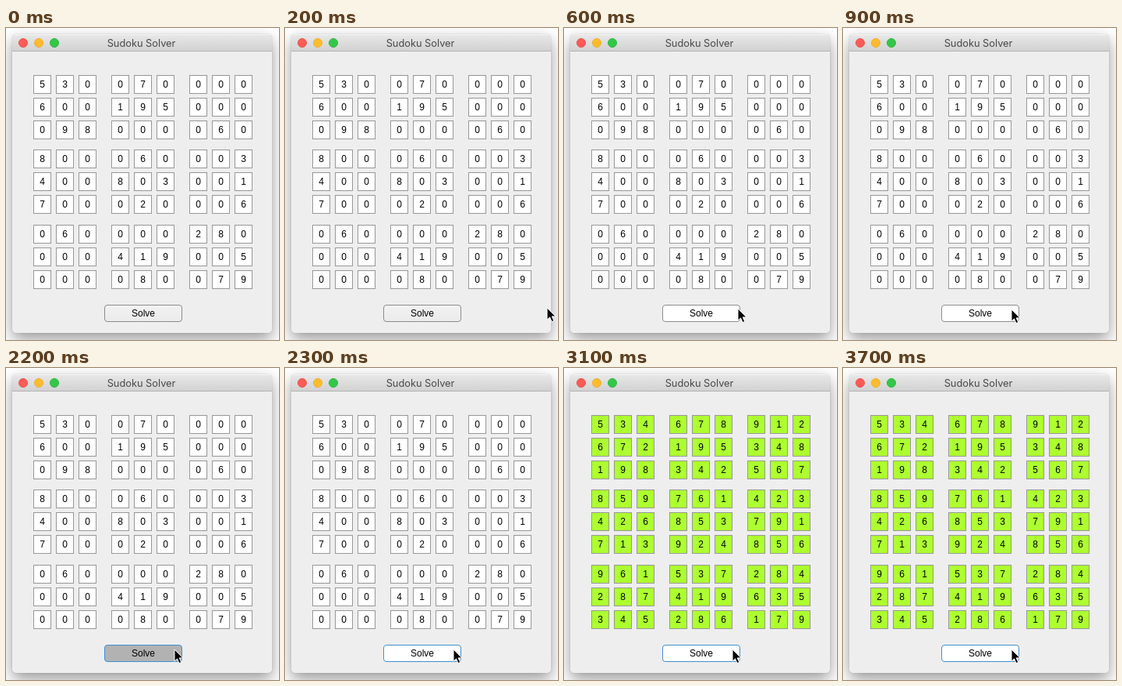
Write an HTML page that moves like this. It is 350 by 398 pixels and loops after 4.1 s.

```html
<!DOCTYPE html>
<html lang="en">
<head>
<meta charset="utf-8">
<title>Sudoku Solver</title>
<style>
  html, body { margin: 0; width: 100%; height: 100%; overflow: hidden; background: #fff; }
  #stage { position: relative; width: 350px; height: 398px; overflow: hidden; background: #fff;
    font: 12px/22px "Liberation Sans", Arial, sans-serif; color: #000; text-align: center; }
  #stage * { box-sizing: border-box; }
  #window { position: absolute; left: 8px; top: 8px; width: 333px; height: 381px;
    border-radius: 5px; background: #eee; overflow: hidden; }
  #shadow { position: absolute; left: 8px; top: 8px; width: 333px; height: 381px; border-radius: 5px;
    box-shadow: 0 0 1px rgba(0,0,0,.45), 0 8px 20px rgba(0,0,0,.4); }
  #bar { height: 22px; padding-right: 2px; background: linear-gradient(#e7e7e7, #d2d2d2);
    border-top: 1px solid #f4f4f4; border-bottom: 1px solid #b4b4b4;
    font: 12.8px/21px Inter, "Open Sans", sans-serif; color: #484848; }
  .light { position: absolute; top: 5px; width: 12px; height: 12px; border-radius: 50%; border: 1px solid; }
  .cell { position: absolute; width: 23px; height: 24px; border: 1px solid #979797; background: #fff; }
  .solved .cell { background: #adff2f; }
  #solve { position: absolute; left: 126px; top: 353px; width: 100px; height: 22px; line-height: 20px;
    border: 1px solid #8c8c8c; border-radius: 4px; background: linear-gradient(#f2f2f2, #ebebeb); }
  #solve.hover { background: #fff; }
  #solve.press { background: #b2b2b2; }
  #solve.focus { border-color: #3f8fce; }
  #cursor { position: absolute; left: -.5px; top: -.5px; overflow: visible; }
</style>
</head>
<body>
<div id="stage">
  <div id="shadow"></div>
  <div id="window"><div id="bar">Sudoku Solver</div></div>
  <div id="grid"></div>
  <div id="solve">Solve</div>
  <svg id="cursor" width="13" height="19">
    <path d="M0 0V15.2L3.5 11.9L6 17.6L8.7 16.4L6.2 10.9H11Z" fill="#000" stroke="#fff" stroke-width="1"/>
  </svg>
</div>
<script>
const $ = id => document.getElementById(id);
const LOOP = 4100, HOVER = 600, PRESS = 2200, RELEASE = 2300, SOLVED = 3000;

const puzzle = "530070000600195000098000060800060003400803001700020006060000280000419005000080079";
const answer = "534678912672195348198342567859761423426853791713924856961537284287419635345286179";

// start time, tip x, tip y
const path = [
  [200, 336, 357], [300, 283, 355], [400, 250, 356], [500, 233, 357],
  [600, 223, 358], [700, 220, 360], [800, 217, 360], [900, 216, 359]
];

function add(parent, cls, style) {
  const el = document.createElement("div");
  el.className = cls;
  Object.assign(el.style, style);
  parent.append(el);
  return el;
}

[["#fc5b57", "#ee5049"], ["#fdbc2e", "#eeae2b"], ["#33c748", "#2cb83e"]].forEach(([fill, edge], i) =>
  add($("window"), "light", { left: 8 + 20 * i + "px", background: fill, borderColor: edge }));

// pixel offset of the nth cell, in blocks of three
const place = (n, start, block) =>
  start + 29 * (n % 3) + Math.floor(block * Math.floor(n / 3)) + "px";
const cells = [...puzzle].map((_, i) =>
  add($("grid"), "cell", { left: place(i % 9, 35, 100), top: place(Math.floor(i / 9), 60, 95.5) }));

let shown = "";
function fill(digits) {
  if (digits === shown) return;
  shown = digits;
  cells.forEach((cell, i) => { cell.textContent = digits[i]; });
}

function draw(t) {
  const step = path.filter(p => p[0] <= t).pop();
  $("cursor").style.display = step ? "block" : "none";
  if (step) $("cursor").style.transform = `translate(${step[1]}px, ${step[2]}px)`;

  const button = $("solve").classList;
  button.toggle("hover", t >= HOVER);
  button.toggle("press", t >= PRESS && t < RELEASE);
  button.toggle("focus", t >= PRESS);

  $("grid").classList.toggle("solved", t >= SOLVED);
  fill(t >= SOLVED ? answer : puzzle);
}

const start = performance.now();
function tick() {
  draw((performance.now() - start) % LOOP);
  requestAnimationFrame(tick);
}
tick();
</script>
</body>
</html>
```
